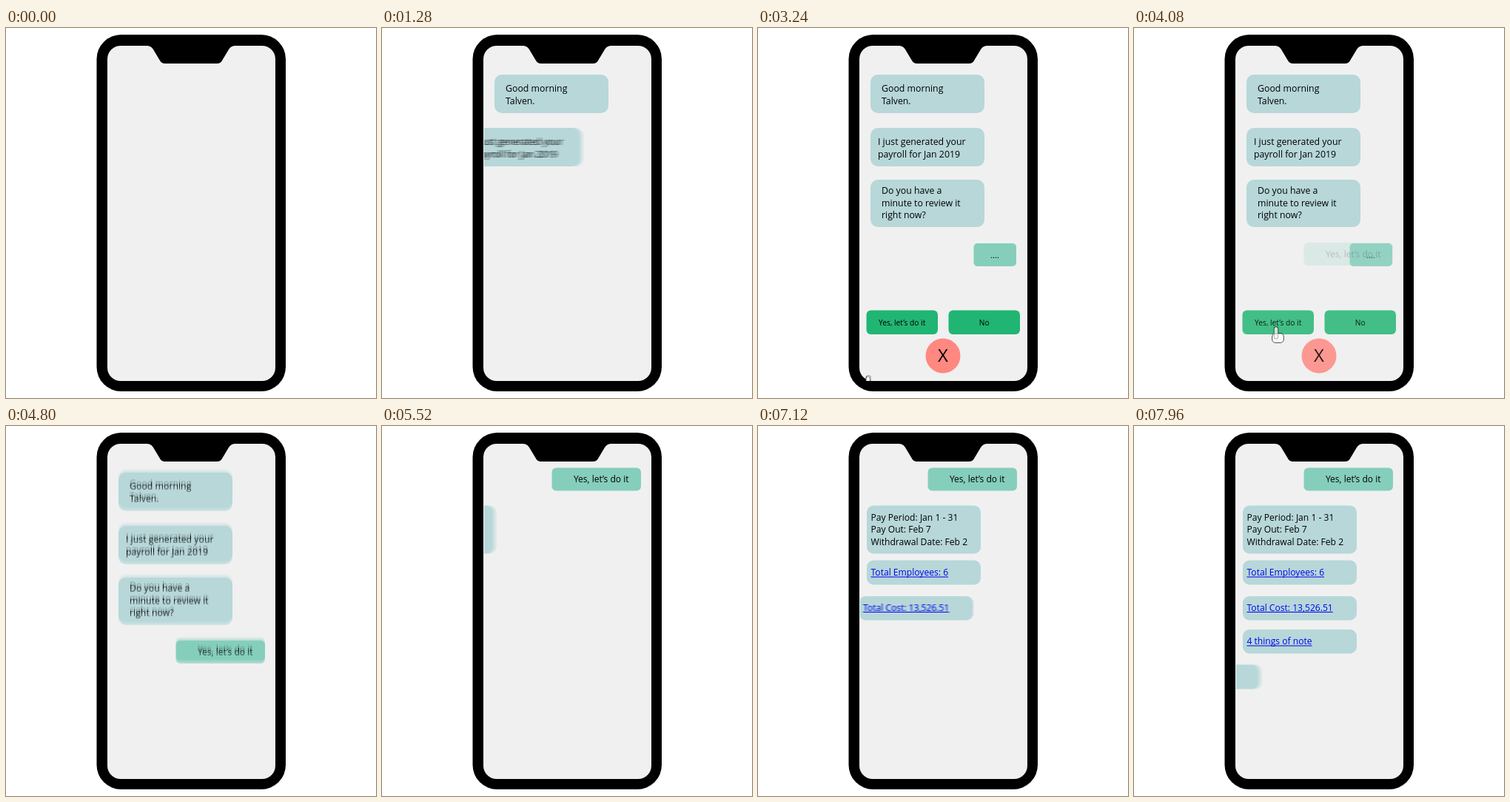
Recreate the animation shown at these times as an HTML page with a canvas. Size 500 by 500 pixels, loop 8 s.

```html
<!DOCTYPE html>
<html lang="en">
<head>
<meta charset="utf-8">
<title>Payroll chat</title>
<style>
html, body { margin: 0; width: 100%; height: 100%; overflow: hidden; background: #fff; }
canvas { display: block; width: 500px; height: 500px; }
</style>
</head>
<body>
<canvas id="stage" width="500" height="500"></canvas>
<script>
const LOOP = 8000, FRAME = 40, SHUTTER = 20, SAMPLES = 8;
const BLUE = '#b7d7d9', MINT = '#85cebc', GREEN = '#21b573', CORAL = '#ff8880';

const stage = document.getElementById('stage').getContext('2d');
const layer = document.createElement('canvas');
layer.width = layer.height = 500;
const ctx = layer.getContext('2d');

const progress = (t, start, duration) => Math.min(1, Math.max(0, (t - start) / duration));
const easeOut = (t, start, duration) => Math.sin(progress(t, start, duration) * Math.PI / 2);

function box(x, y, w, h, r, color) {
  ctx.fillStyle = color;
  ctx.beginPath();
  ctx.roundRect(x, y, w, h, r);
  ctx.fill();
}

function text(str, x, y, size, { color = '#000', align = 'left', underline = false } = {}) {
  ctx.font = `${size}px "Open Sans", "Noto Sans", sans-serif`;
  ctx.textAlign = align;
  ctx.fillStyle = color;
  ctx.fillText(str, x, y);
  if (underline) ctx.fillRect(x, y + 1.5, ctx.measureText(str).width, 1);
}

// Draws with a temporary offset and opacity.
function place(dx, dy, alpha, draw) {
  ctx.save();
  ctx.translate(dx, dy);
  ctx.globalAlpha = alpha;
  draw();
  ctx.restore();
}

const slideIn = (t, start, duration, dx, dy, draw) => {
  if (t < start) return;
  const rest = 1 - easeOut(t, start, duration);
  place(dx * rest, dy * rest, 1, draw);
};

const greetings = [
  { y: 63, h: 52, x: 167, base: 86, lines: ['Good morning', 'Talven.'] },
  { y: 135, h: 52, x: 162, base: 158, lines: ['I just generated your', 'payroll for Jan 2019'] },
  { y: 205, h: 64, x: 167, base: 224, lines: ['Do you have a', 'minute to review it', 'right now?'] }
];
const details = [
  { y: 107.5, h: 65, base: 127.5, lines: ['Pay Period: Jan 1 - 31', 'Pay Out: Feb 7', 'Withdrawal Date: Feb 2'] },
  { y: 181.5, h: 33, base: 202, link: 'Total Employees: 6' },
  { y: 230, h: 32.5, base: 249.5, link: 'Total Cost: 13,526.51' },
  { y: 275, h: 32.5, base: 295, link: '4 things of note' },
  { y: 322.5, h: 33 }
];

function drawPhone() {
  ctx.fillStyle = '#fff';
  ctx.fillRect(0, 0, 500, 500);
  box(122.5, 9, 255.5, 482, 33, '#000');
  box(137, 24, 227, 453, 18, '#f0f0f0');
  ctx.fillStyle = '#000';
  ctx.beginPath();
  ctx.moveTo(188, 23);
  ctx.lineTo(190, 24);
  ctx.quadraticCurveTo(196, 24, 199, 29);
  ctx.lineTo(208, 44);
  ctx.quadraticCurveTo(210, 48, 215, 48);
  ctx.lineTo(285, 48);
  ctx.quadraticCurveTo(290, 48, 292, 44);
  ctx.lineTo(301, 29);
  ctx.quadraticCurveTo(304, 24, 310, 24);
  ctx.lineTo(312, 23);
  ctx.fill();
}

function drawGreetings(t) {
  greetings.forEach((m, i) => slideIn(t, 668 + 400 * i, 370, -169, 0, () => {
    box(152, m.y, 154, m.h, 10, BLUE);
    m.lines.forEach((line, n) => text(line, m.x, m.base + 16.7 * n, 12.3));
  }));
}

function drawButtons(t, alpha) {
  const button = (start, x, label) => slideIn(t, start, 420, 0, 96, () => {
    box(x, 381.5, 96.5, 32.5, 6, GREEN);
    text(label, x + 48.2, 401.5, 10.2, { align: 'center' });
  });
  place(0, 0, alpha, () => {
    // place() resets opacity for sliding parts, so they only fade once at rest.
    if (alpha < 1) {
      for (const [x, label] of [[146.5, 'Yes, let’s do it'], [257.5, 'No']]) {
        box(x, 381.5, 96.5, 32.5, 6, GREEN);
        text(label, x + 48.2, 401.5, 10.2, { align: 'center' });
      }
      drawClose();
      return;
    }
    button(2308, 146.5, 'Yes, let’s do it');
    button(2420, 257.5, 'No');
    slideIn(t, 2560, 450, 0, 58, drawClose);
  });
}

function drawClose() {
  box(226.5, 419.5, 47, 47, 23.5, CORAL);
  text('X', 250, 451, 24, { align: 'center' });
}

function drawPointer(t, alpha) {
  if (t < 3212) return;
  const p = easeOut(t, 3212, 740);
  place(146 + 46 * p, 475 - 71 * p, alpha, () => {
    ctx.fillStyle = '#fff';
    ctx.strokeStyle = '#000';
    ctx.lineWidth = 1.5;
    ctx.lineJoin = 'round';
    ctx.beginPath();
    ctx.roundRect(-2.5, 0, 5, 16, 2.5);
    ctx.roundRect(-5, 9, 15, 12, 4);
    ctx.stroke();
    ctx.fill();
  });
}

function drawReply(t, fade) {
  if (fade < 1) {
    place(0, 0, 1 - fade, () => {
      const dx = 73 * (1 - easeOut(t, 1888, 350));
      box(291.5 + dx, 291, 57.5, 31, 5, MINT);
      text('....', 320 + dx, 310.5, 11, { align: 'center' });
    });
  }
  if (fade > 0) {
    place(0, 0, fade, () => {
      box(229.5, 290, 120.5, 31, 6, MINT);
      text('Yes, let’s do it', 259, 305 + 4.5, 12);
    });
  }
}

function drawDetails(t) {
  details.forEach((m, i) => slideIn(t, 5488 + 600 * i, 560, -164, 0, () => {
    box(147, m.y, 154, m.h, 9, BLUE);
    (m.lines || []).forEach((line, n) => text(line, 152.5, m.base + 16.6 * n, 12.1));
    if (m.link) text(m.link, 152.5, m.base, 12.1, { color: '#0000f0', underline: true });
  }));
}

function drawScene(t) {
  drawPhone();
  ctx.save();
  ctx.beginPath();
  ctx.rect(138, 47, 226, 430);
  ctx.clip();
  const fade = progress(t, 4010, 390);
  place(0, -233.5 * easeOut(t, 4800, 640), 1, () => {
    if (t < 5480) drawGreetings(t);
    if (t >= 1888) drawReply(t, fade);
  });
  if (fade < 1) {
    drawButtons(t, 1 - fade);
    drawPointer(t, 1 - progress(t, 3950, 450));
  }
  drawDetails(t);
  ctx.restore();
}

// Averages several moments of each frame for motion blur.
function render(t) {
  for (let i = 0; i < SAMPLES; i++) {
    drawScene(Math.max(0, t + SHUTTER * ((i + 0.5) / SAMPLES - 0.5)));
    stage.globalAlpha = 1 / (i + 1);
    stage.drawImage(layer, 0, 0);
  }
}

const begin = performance.now();
let shown = -1;
function tick() {
  const t = Math.floor((performance.now() - begin) % LOOP / FRAME) * FRAME;
  if (t !== shown) render(shown = t);
  requestAnimationFrame(tick);
}
tick();
</script>
</body>
</html>
```
